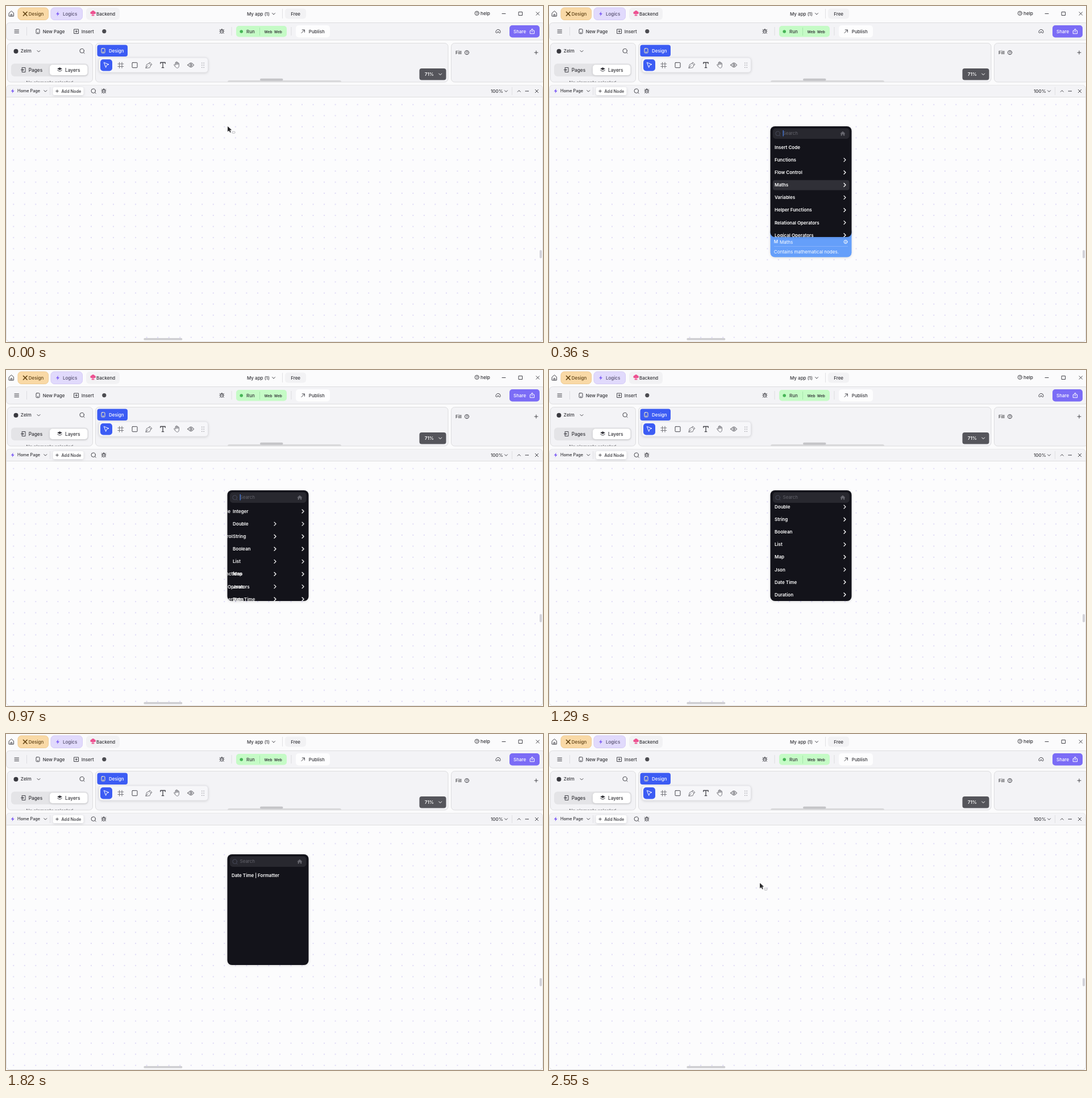
These frames come from a looping animation (945x592 px, 2.59 s). An HTML page:

```html
<!DOCTYPE html>
<html lang="en">
<head>
<meta charset="utf-8">
<title>Node menu</title>
<style>
html, body { margin: 0; width: 100%; height: 100%; overflow: hidden; background: #fbfbfc; }
svg { display: block; }
text { font: 500 8px Inter, sans-serif; fill: #333338; white-space: pre; }
.s7 { font-size: 7.3px; }
.b { font-weight: 600; }
.w { fill: #fff; }
.l { fill: none; stroke: #44444a; stroke-width: 1; stroke-linecap: round; stroke-linejoin: round; }
.thin { stroke: #77777d; }
.lw { stroke: #fff; }
.box { fill: #f3f3f6; stroke: #dddddf; }
.soft { filter: drop-shadow(0 1px 2px #0002); }
.page text { font-weight: 600; fill: #fff; }
.tip text { font-weight: 400; fill: #fff; }

/* One loop is 2590 ms; hard changes use step-end. */
.a { animation: 2.59s infinite; }
#menu { animation-name: menu; animation-timing-function: step-end; }
#caret { animation-name: caret; animation-timing-function: step-end; }
#hover { animation-name: hover; animation-timing-function: step-end; }
#tipA { animation-name: tipA; animation-timing-function: step-end; }
#tipB { animation-name: tipB; animation-timing-function: step-end; }
#tipC { animation-name: tipC; animation-timing-function: step-end; }
#page1 { animation: slide1 2.59s infinite, show1 2.59s step-end infinite; }
#page2 { animation: slide2 2.59s infinite, show2 2.59s step-end infinite; }
#page3 { animation: slide3 2.59s infinite, show3 2.59s step-end infinite; }
#list2 { animation-name: scroll; }
#cursor { animation: move 2.59s infinite, seen 2.59s step-end infinite; }

@keyframes menu { 0%, 85.71%, 100% { opacity: 0 } 3.09% { opacity: 1 } }
@keyframes caret { 0% { opacity: 1 } 40%, 100% { opacity: 0 } }
@keyframes hover {
  0% { opacity: 0; transform: translateY(-66px) }
  6.18% { opacity: 1; transform: translateY(-66px) }
  8.5% { opacity: 1; transform: translateY(-44px) }
  10.4% { opacity: 1; transform: translateY(-22px) }
  12.36% { opacity: 1; transform: none }
  18.53% { opacity: 1; transform: translateY(22px) }
  21% { opacity: 1; transform: translateY(44px) }
  28.57%, 100% { opacity: 0 }
}
@keyframes tipA { 0%, 18.53%, 100% { opacity: 0 } 12.36% { opacity: 1 } }
@keyframes tipB { 0%, 28.57%, 100% { opacity: 0 } 21% { opacity: 1 } }
@keyframes tipC { 0%, 100% { opacity: 0 } 71.04% { opacity: 1 } }
@keyframes slide1 {
  0%, 28.57% { transform: none; animation-timing-function: cubic-bezier(.2,1,.3,1) }
  44.02%, 100% { transform: translateX(-47.7px) }
}
@keyframes slide2 {
  0%, 28.57% { transform: translateX(143px); animation-timing-function: cubic-bezier(.16,1,.3,1) }
  44.02%, 54.05% { transform: none; animation-timing-function: cubic-bezier(.2,1,.3,1) }
  69.5%, 100% { transform: translateX(-47.7px) }
}
@keyframes slide3 {
  0%, 54.05% { transform: translateX(143px); animation-timing-function: cubic-bezier(.16,1,.3,1) }
  69.5%, 100% { transform: none }
}
@keyframes show1 { 0% { opacity: 1 } 44.02%, 100% { opacity: 0 } }
@keyframes show2 { 0%, 69.5%, 100% { opacity: 0 } 28.57% { opacity: 1 } }
@keyframes show3 { 0%, 100% { opacity: 0 } 54.05% { opacity: 1 } }
@keyframes scroll {
  0%, 41.7% { transform: none; animation-timing-function: ease-out }
  47.1%, 100% { transform: translateY(-30px) }
}
@keyframes move {
  0%, 3.09% { transform: translate(390px, 212px) }
  75% { transform: translate(500px, 255px); animation-timing-function: ease-out }
  82.63%, 85.71% { transform: translate(622px, 261px); animation-timing-function: ease-in-out }
  98.07%, 100% { transform: translate(371px, 262.5px) }
}
@keyframes seen { 0%, 77.22%, 100% { opacity: 1 } 3.09% { opacity: 0 } }
</style>
</head>
<body>
<svg width="945" height="592" viewBox="0 0 945 592">
  <defs>
    <pattern id="dots" x="3.5" y="164" width="19.53" height="19.53" patternUnits="userSpaceOnUse">
      <circle cx="9.75" cy="9.75" r="1.1" fill="#dcd7f5"/>
    </pattern>
    <clipPath id="view"><path d="M389.5 234H532.5V399a8 8 0 0 1-8 8H397.5a8 8 0 0 1-8-8Z"/></clipPath>
    <clipPath id="side"><rect x="2" y="65" width="150" height="68.5"/></clipPath>
    <path id="down" class="l" d="M-2.5-1.2 0 1.3 2.5-1.2"/>
    <g id="lens" class="l"><circle r="3.7"/><path d="M2.7 2.7 4.5 4.5"/></g>
    <g id="bug" class="l">
      <rect x="-2.3" y="-2.3" width="4.6" height="6" rx="2.3"/>
      <path d="M-1.5-2.3a1.5 1.5 0 0 1 3 0M-2.3 0H-4M2.3 0H4M-2.3-1.5-3.7-3M2.3-1.5 3.7-3M-2.2 2.2-3.7 3.6M2.2 2.2 3.7 3.6M-.8 .6H.8"/>
    </g>
    <path id="bolt" d="M1-4-3 .8H-.4L-1 4 3-.9H.4Z" fill="#7c5cf5"/>
    <g id="help" class="l"><circle r="3.6"/><path d="M-1.1-.8C-1-2.2 1.2-2.2 1.1-.7 1 .1 0 0 0 .9M0 2.1v.1"/></g>
    <g id="phone" class="l"><rect x="-3" y="-4" width="6" height="8" rx="1.2"/><path d="M-.8 2.2H.8"/></g>
    <g id="info" class="l lw" stroke-width=".8"><circle r="3"/><path d="M0-.2v1.5M0-1.5v.1"/></g>
  </defs>

  <!-- title bar -->
  <path class="l" d="M5.5 12.3 9.5 8.8l4 3.5V18h-8ZM8.3 18v-3.2h2.4V18"/>
  <rect x="21" y="3" width="53.5" height="21.5" rx="6" fill="#f9d9a6" stroke="#efcb92"/>
  <path d="M30.5 10.5 37 17M37 10.5 30.5 17" stroke="#634414" stroke-width="1.7" stroke-linecap="round"/>
  <text x="39.7" y="16.7" style="fill:#5f4317">Design</text>
  <rect x="79" y="3" width="55.5" height="21.5" rx="6" fill="#e1dafc" stroke="#d5cbf7"/>
  <use href="#bolt" x="91" y="13.8"/>
  <text x="100" y="16.7" style="fill:#544e6c">Logics</text>
  <rect x="141" y="3" width="59" height="21.5" rx="6" fill="#f2f2f4"/>
  <path d="M150 14.3a2.3 2.3 0 0 1 .4-4.5 3 3 0 0 1 5.6 0 2.3 2.3 0 0 1 .3 4.5Z" fill="#ed5291"/>
  <path d="M150.5 16.5h5M153 14v3.5" stroke="#ed5291" stroke-width="1.3"/>
  <text x="159" y="16.7">Backend</text>
  <text x="424" y="16.7">My app (1)</text><use href="#down" x="471" y="13.8"/>
  <path d="M486.5 5v17" stroke="#e1e1e4"/>
  <rect x="491" y="4.5" width="37" height="18" rx="5" fill="#f2f2f4"/>
  <text x="501.2" y="16.7">Free</text>
  <use href="#help" x="828.7" y="12.8"/><text x="835" y="15.5" style="font-size:8.2px">help</text>
  <path class="l" d="M873 13.5h6M902.5 10.5h6v6h-6ZM933 10.7l5.5 5.5M938.5 10.7l-5.5 5.5"/>

  <!-- toolbar -->
  <rect class="box" x=".5" y="29.5" width="948" height="30.5" rx="6"/>
  <path class="l" d="M15 42h7.5M15 44.7h7.5M15 47.4h7.5"/>
  <path d="M36.5 37v15M397 37v15M502 37v15" stroke="#dcdce0"/>
  <use href="#phone" x="56" y="44.7"/><text x="64.7" y="47.6">New Page</text>
  <path class="l" d="M120 41h7.5v7.5H120ZM123.7 43v3.5M122 44.8h3.5"/><text x="132.8" y="47.6">Insert</text>
  <circle cx="172.8" cy="44.6" r="3.6" fill="#4b4b50"/>
  <use href="#bug" x="379.8" y="44.4"/>
  <rect x="405" y="35" width="89" height="19.5" rx="5" fill="#c5fbc6"/>
  <circle cx="414.2" cy="45" r="2.8" fill="#46b556"/>
  <text x="423" y="47.6">Run</text>
  <path d="M446.5 38v14" stroke="#a9e5ad"/>
  <text x="454.5" y="47.5" style="font-size:6.4px;font-weight:600">Web  Web</text>
  <rect x="510" y="34" width="60" height="21.5" rx="5" fill="#fdfdfe"/>
  <path class="l" d="M520 47.5l5.3-5.3M521.2 42h4.2v4.2"/><text x="532.8" y="47.6">Publish</text>
  <path class="l" d="M862 45.5a4 4 0 0 1 8 0v1.2a1.8 1.8 0 0 1-3 0v-1.2h-2v1.2a1.8 1.8 0 0 1-3 0Z"/>
  <rect x="886" y="34" width="53" height="21.5" rx="5" fill="#7b6cf6"/>
  <text class="w" x="893" y="47.6">Share</text>
  <path class="l lw" d="M923.8 43.5h-1.6v5.2h7.4v-5.2H928M925.9 46v-5.6M923.9 42.2l2-2 2 2"/>

  <!-- side and design panels -->
  <rect class="box" x="2.5" y="65.5" width="150" height="68.5" rx="6"/>
  <circle cx="17.5" cy="79.7" r="4" fill="#38383e"/>
  <text x="25.8" y="82.4">Zelm</text><use href="#down" x="57.5" y="79.7"/><use href="#lens" x="133.6" y="79"/>
  <rect x="9" y="101.5" width="136" height="22.5" rx="6" fill="#e4e4e7"/>
  <rect class="soft" x="77" y="103.5" width="66.5" height="18.5" rx="5" fill="#fff"/>
  <path class="l" d="M28.5 108.5h5.5v8h-5.5zM26.5 112.5h4.5M29.5 111l1.6 1.5-1.6 1.5"/>
  <text x="39.7" y="115.5" style="font-size:8.3px">Pages</text>
  <path d="M94.5 108.2l4.3 2.4-4.3 2.4-4.3-2.4Z" fill="#37373d"/><path class="l" d="M90.7 113.2l3.8 2.2 3.8-2.2"/>
  <text x="104" y="115.5" style="font-size:8.3px">Layers</text>
  <g clip-path="url(#side)"><text x="35.5" y="137.8">No elements selected</text></g>

  <rect class="box" x="157.5" y="65.5" width="620.5" height="68.5" rx="6"/>
  <path d="M390 134a3 3 0 0 1 3-3h194a3 3 0 0 1 3 3Z" fill="#d9d9db"/>
  <rect x="447" y="127.8" width="40.5" height="4" rx="2" fill="#c5c5c8"/>
  <rect x="160.5" y="68.5" width="53.5" height="20.5" rx="4" fill="#3c5cf4"/>
  <use href="#phone" x="171" y="78.8" style="stroke:#fff"/>
  <g class="l lw"><rect x="168" y="74.8" width="6" height="8" rx="1.2"/><path d="M170.2 81h1.6"/></g>
  <text class="w" x="181" y="81.7">Design</text>
  <rect class="soft" x="163.5" y="91" width="192" height="26" rx="5" fill="#f6f6f9" stroke="#e2e2e6"/>
  <rect x="166" y="94" width="21" height="20.5" rx="5" fill="#3c5cf4"/>
  <path class="l lw" d="M172.7 99.7l8.3 3.2-3.7 1.3-1.5 3.8Z"/>
  <path class="l thin" d="M199.5 99.3v10M204 99.3v10M196.8 102h10M196.8 106.5h10"/>
  <rect class="l" x="222" y="99.7" width="9" height="9" rx="1"/>
  <path class="l thin" d="M246 109l1.5-6 4.5-2 3 3-2 4.4ZM246 109l4-4M251.5 101l1.5-2 4 4-2 1.3"/>
  <path class="l" style="stroke-width:1.3" d="M271.8 101.5v-2h8.4v2M276 99.5v9.2M274.3 108.7h3.4"/>
  <path class="l thin" d="M297.3 106l-1.6-2c-.5-1 .7-1.6 1.4-.8l1 1v-4.2c0-1.2 1.5-1.2 1.5 0v-1c0-1.2 1.6-1.2 1.6 0v1c0-1 1.6-1 1.6 0v1.2c0-1 1.6-1 1.6 0v4c0 5.3-5 5.3-7.1.8ZM299.6 100v3M301.2 100v3M302.8 101v2"/>
  <path class="l" d="M320 104q5.3-7.5 10.6 0-5.3 7.5-10.6 0Z"/><circle class="l" cx="325.3" cy="104" r="1.7"/>
  <path d="M344.8 99.8v9.5M348.2 99.8v9.5" stroke="#a5a5ab" stroke-width="1.4" stroke-dasharray="1.5 2.3"/>
  <rect x="727.5" y="110" width="47" height="20.5" rx="4" fill="#55555b"/>
  <text class="w b" x="736.8" y="123.2">71%</text><path class="l lw" d="M761.7 119l2.5 2.5 2.5-2.5"/>

  <rect class="box" x="783.5" y="65.5" width="165" height="68.5" rx="6"/>
  <text x="791" y="84.7">Fill</text><use href="#help" x="811" y="82"/>
  <path class="l" d="M930 82h6M933 79v6"/>

  <!-- node canvas -->
  <rect x=".5" y="139.5" width="944" height="452" rx="6" fill="#fcfcfd" stroke="#dddddf"/>
  <path d="M1 160.5V145.5a6 6 0 0 1 6-6H938a6 6 0 0 1 6 6V160.5Z" fill="#f3f3f6"/>
  <path d="M1 160.5H944" stroke="#dededf"/>
  <rect x="3.5" y="164" width="938" height="424" fill="url(#dots)"/>
  <use href="#bolt" x="11.7" y="149.8"/>
  <text class="s7" x="20" y="152.3">Home Page</text><use href="#down" x="69.3" y="149.8"/>
  <path d="M77.5 143v14M890.5 143v14" stroke="#e0e0e4"/>
  <rect class="soft" x="82.5" y="143" width="54" height="14" rx="3" fill="#fff"/>
  <path class="l" d="M87.7 150h4.6M90 147.7v4.6"/><text class="s7" x="97.5" y="152.6">Add Node</text>
  <use href="#lens" x="153.7" y="149.6"/><use href="#bug" x="172" y="149.6"/>
  <text x="853" y="152.8">100%</text><use href="#down" x="880" y="150"/>
  <path class="l" d="M900.3 151.2l2.5-2.5 2.5 2.5M931.3 147.3l5.4 5.4M936.7 147.3l-5.4 5.4"/>
  <path d="M913.8 150h6" stroke="#44444a" stroke-width="1.4" stroke-dasharray="1.5 .7"/>
  <rect x="242.3" y="585" width="68" height="3.8" rx="1.9" fill="#d0d0d3"/>
  <rect x="939" y="430" width="4" height="14.5" rx="2" fill="#d3d3da"/>

  <!-- node menu -->
  <g id="menu" class="a">
    <g id="tips"></g>
    <rect class="soft" x="389.5" y="212" width="143" height="195" rx="8" fill="#13131a"/>
    <rect x="394" y="215.5" width="134.5" height="18.5" rx="5" fill="#28282f"/>
    <g class="l" style="stroke:#484b5b"><circle cx="402.6" cy="224.7" r="3.8" stroke="#484b5b"/><path d="M405.3 227.5l1.8 1.8"/></g>
    <text x="411.5" y="227.4" style="font-weight:400;fill:#64646c">Search</text>
    <rect id="caret" class="a" x="411.6" y="219" width="1.2" height="10.5" fill="#4680ee"/>
    <path d="M512.3 224.8l4.6-4 4.6 4h-1.3v3.7h-2.3v-2.5h-2v2.5h-2.3v-3.7Z" fill="#66666e"/>
    <g clip-path="url(#view)">
      <rect id="hover" class="a" x="394" y="306.7" width="134.5" height="17.7" rx="4" fill="#303037"/>
      <g id="page1" class="page"></g>
      <g id="page2" class="page"><g id="list2" class="a"></g></g>
      <g id="page3" class="page"></g>
    </g>
  </g>

  <g id="cursor">
    <path d="M0 0V9.6L2.4 7.6 4.3 11 5.8 10.2 4.2 6.8 7.2 6.5Z" fill="#29292c"/>
    <rect x="8" y="9.2" width="5" height="3" rx=".8" fill="#fff" stroke="#aaaab0" stroke-width=".8"/>
  </g>
</svg>
<script>
const $ = id => document.getElementById(id);

// Rows are 22.1 px apart; `plain` rows have no chevron.
const rows = (id, names, plain) => {
  $(id).innerHTML = names.map((name, i) => {
    const y = 249 + i * 22.1;
    const arrow = name === plain ? '' :
      `<path class="l lw" style="stroke-width:1.3" d="M519 ${y - 3}l3 3-3 3"/>`;
    return `<text x="397" y="${y + 2.9}">${name}</text>${arrow}`;
  }).join('');
};
rows('page1', ['Insert Code', 'Functions', 'Flow Control', 'Maths', 'Variables',
  'Helper Functions', 'Relational Operators', 'Logical Operators'], 'Insert Code');
rows('list2', ['Integer', 'Double', 'String', 'Boolean', 'List', 'Map', 'Json',
  'Date Time', 'Duration']);
rows('page3', ['Date Time | Formatter'], 'Date Time | Formatter');

const tip = (id, name, lines) => `
  <g id="${id}" class="a tip">
    <rect class="soft" x="389.5" y="390" width="143" height="${41 + lines.length * 11.5}" rx="8" fill="#659ffa"/>
    <text x="395.8" y="418" style="font-weight:500">${name[0]}</text>
    <text x="406" y="418.6">${name}</text>
    <use href="#info" x="522" y="415.5"/>
    <path d="M396 423.5H526" stroke="#8db8fc" stroke-width=".8"/>
    ${lines.map((s, i) => `<text x="395.8" y="${436.2 + i * 11.2}">${s}</text>`).join('')}
  </g>`;
$('tips').innerHTML =
  tip('tipA', 'Maths', ['Contains mathematical nodes.']) +
  tip('tipB', 'Helper Functions', ['Contains helper nodes.']) +
  tip('tipC', 'Date Time | Formatter', ['Returns different types of Date', 'Time formats as String.']);
</script>
</body>
</html>
```
